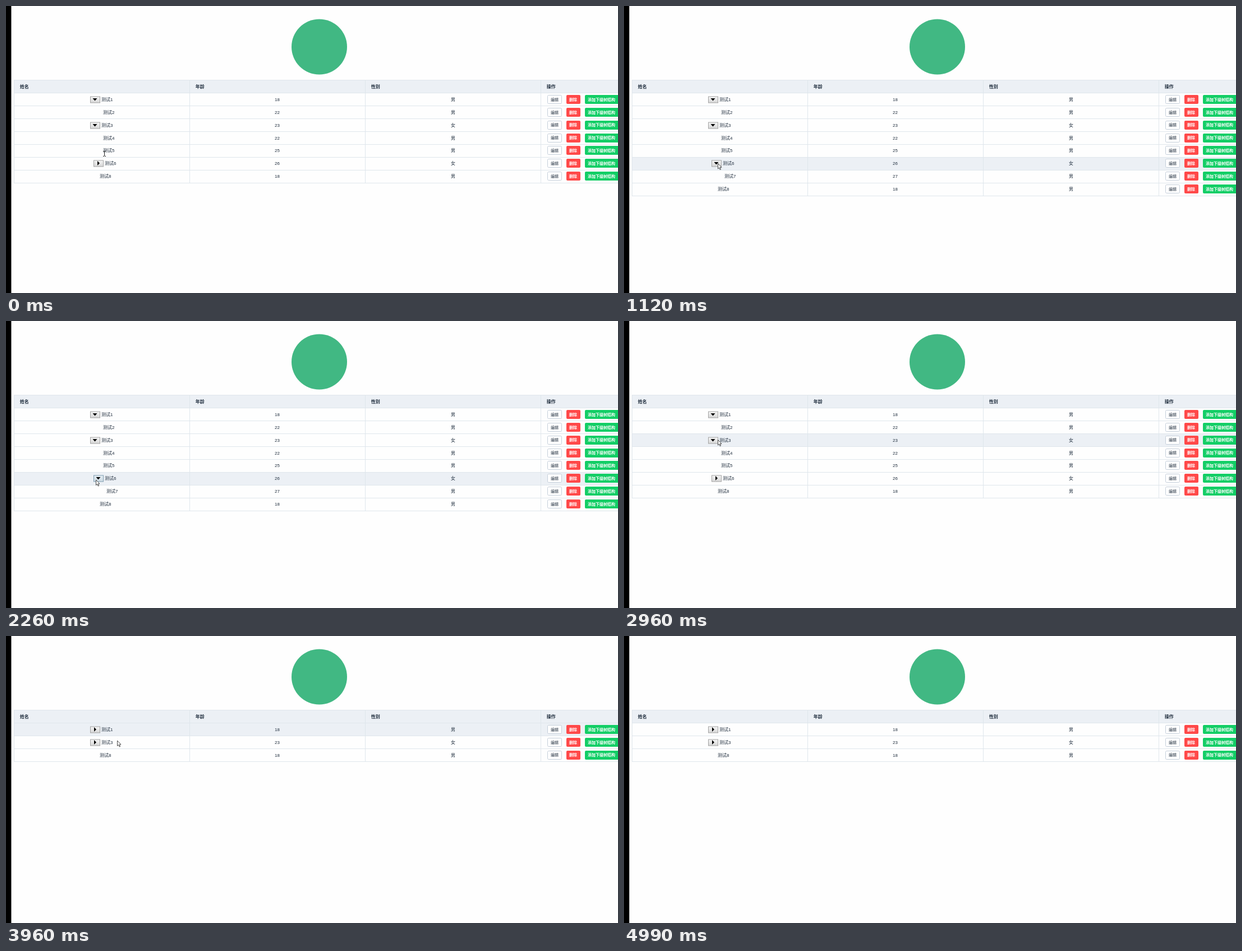
These frames come from a looping animation (1091x513 px, 5580 ms). An HTML page:

```html
<!DOCTYPE html>
<html lang="zh-CN">
<head>
<meta charset="utf-8">
<title>树形表格</title>
<style>
  html, body { margin: 0; width: 100%; height: 100%; overflow: hidden; background: #fefefe; }
  svg { display: block; width: 1091px; height: 513px; }
  text { font: 8px "Liberation Sans", "Noto Sans CJK SC", "Noto Sans CJK", sans-serif; fill: #1f2d3d; white-space: pre; }
  .head { font-weight: bold; }
  .small { font-size: 7px; }
  .mid { text-anchor: middle; }
  .light { fill: #fff; font-weight: bold; }
  .line { stroke: #dfe6ec; fill: none; }
</style>
</head>
<body>
<svg viewBox="0 0 1091 513">
  <defs>
    <linearGradient id="face" x2="0" y2="1">
      <stop offset="0" stop-color="#f6f6f6"/><stop offset="1" stop-color="#d6d6d6"/>
    </linearGradient>
    <linearGradient id="pressed" x2="0" y2="1">
      <stop offset="0" stop-color="#e6eef4"/><stop offset="1" stop-color="#cddbe4"/>
    </linearGradient>
  </defs>
  <rect width="1091" height="513" fill="#fefefe"/>
  <rect width="9.4" height="513" fill="#000"/>
  <circle cx="558.5" cy="73" r="49.5" fill="#41b883"/>
  <g id="table"></g>
  <path id="beam" transform="translate(175.5 264)" d="M-2.5-4.5H-.5M.5-4.5H2.5M0-4V4M-2.5 4.5H-.5M.5 4.5H2.5" stroke="#222" fill="none"/>
  <path id="arrow" d="M.5.5V10L2.7 8 4.2 11.6 5.6 11 4.1 7.5H7Z" fill="#fff" stroke="#222" stroke-width=".8"/>
</svg>
<script>
const LOOP = 5580, TICK = 141, LEFT = 14, RIGHT = 1091, TOP = 155, PITCH = 22.95;
const TINT = "#ecf0f5", HEADS = ["姓名", "年龄", "性别", "操作"];

const node = (id, age, sex, ...kids) => ({ id, age, sex, kids });
const TREE = [
  node(1, 18, "男", node(2, 22, "男")),
  node(3, 23, "女", node(4, 22, "男"), node(5, 25, "男"), node(6, 26, "女", node(7, 27, "男"))),
  node(8, 18, "男")
];

// pointer stops in ticks; a click toggles the row the pointer rests on
const stop = (x, y, arrive, leave = arrive, click) => ({ x, y, arrive, leave, click });
const STOPS = [
  stop(173, 256, 1), stop(167, 281, 3, 8, 4), stop(158, 212, 11, 13), stop(160, 283.5, 15, 16, 17),
  stop(167, 212, 19, 22, 23), stop(162, 171, 24, 27, 28), stop(198, 186.5, 28),
  stop(448, 323.5, 29), stop(1006, 480, 33), stop(987, 499.5, 34)
];

const get = id => document.getElementById(id);
const colX = i => LEFT + 313 * i;
const lineY = i => Math.round(TOP + PITCH * i) + .5;
const label = (x, y, s, cls = "") => `<text x="${x}" y="${y}" class="${cls}">${s}</text>`;
const box = (x, y, w, h, fill, more = "") =>
  `<rect x="${x}" y="${y}" width="${w}" height="${h}" fill="${fill}" ${more}/>`;

function visible(nodes, open, depth = 0) {
  return nodes.flatMap(n => [{ ...n, depth, open: open.has(n.id) },
    ...(open.has(n.id) ? visible(n.kids, open, depth + 1) : [])]);
}

// replays the clicks up to a tick
function stateAt(tick) {
  const open = new Set([1, 3]);
  let pressed, hovered;
  for (const s of STOPS) {
    const { id } = visible(TREE, open)[Math.floor((s.y - TOP) / PITCH)] || {};
    if (s.leave > s.arrive && tick >= s.arrive && tick <= s.leave + 1) hovered = id;
    if (tick === s.click - 1) pressed = id;
    if (tick >= s.click && !open.delete(id)) open.add(id);
  }
  return { rows: visible(TREE, open), pressed, hovered };
}

function pointerAt(tick) {
  const i = STOPS.findLastIndex(s => s.arrive <= tick);
  const a = STOPS[i], b = STOPS[i + 1] || a;
  const k = Math.max(0, (tick - a.leave) / (b.arrive - a.leave || 1));
  return [a.x + (b.x - a.x) * k, a.y + (b.y - a.y) * k];
}

function toggle(x, y, open, down) {
  const tri = open ? `M${x + 4.5} ${y - 2}h8l-4 4.5z` : `M${x + 7} ${y - 4}v8l4-4z`;
  return box(x + .5, y - 5, 17, 11, `url(#${down ? "pressed" : "face"})`,
    `stroke="${down ? "#7f9db0" : "#a3a3a3"}"`) + `<path d="${tri}"/>`;
}

function actions(y) {
  const top = Math.round(y - 8);
  return box(965.5, top + .5, 25, 15, "#fff", 'rx="2" stroke="#c4ced9"') +
    box(999, top, 25, 16, "#ff4949", 'rx="2"') +
    box(1032, top, 64, 16, "#13ce66", 'rx="2"') +
    label(971, y + 2.7, "编辑", "small") +
    label(1004, y + 2.7, "删除", "small light") +
    label(1037, y + 2.7, "添加下级树结构", "small light");
}

function row({ id, age, sex, kids, depth, open }, i, { pressed, hovered }) {
  const y = 167 + 22.87 * i, parent = kids.length > 0;
  const x = (parent ? 170 : 167) + 6 * depth;
  let out = id === hovered ? box(LEFT, lineY(i), RIGHT - LEFT, PITCH, TINT) : "";
  if (parent) out += toggle(x - 20, Math.round(y), open, id === pressed);
  return out + label(x, y + 3, "测试" + id) + label(483.5, y + 3, age, "mid") +
    label(797, y + 3, sex, "mid") + actions(y);
}

function table(state) {
  const count = state.rows.length;
  let grid = "", out = box(LEFT, 133, RIGHT - LEFT, PITCH, TINT);
  HEADS.forEach((s, i) => {
    out += label(colX(i) + 10.8, 147.2, s, "head");
    grid += `M${colX(i) + .5} 132V${lineY(count)}`;
  });
  state.rows.forEach((r, i) => out += row(r, i, state));
  for (let i = -1; i <= count; i++) grid += `M${LEFT} ${lineY(i)}H${RIGHT}`;
  return out + `<path class="line" d="${grid}"/>`;
}

let shown = -1;
function draw(t) {
  const tick = Math.floor(t / TICK), moving = tick >= STOPS[0].arrive;
  if (tick === shown) return;
  shown = tick;
  get("table").innerHTML = table(stateAt(tick));
  get("beam").style.display = moving ? "none" : "";
  get("arrow").style.display = moving && tick <= STOPS.at(-1).leave ? "" : "none";
  if (moving) get("arrow").setAttribute("transform", `translate(${pointerAt(tick)})`);
}

const start = performance.now();
function frame() {
  draw((performance.now() - start) % LOOP);
  requestAnimationFrame(frame);
}
frame();
</script>
</body>
</html>
```
